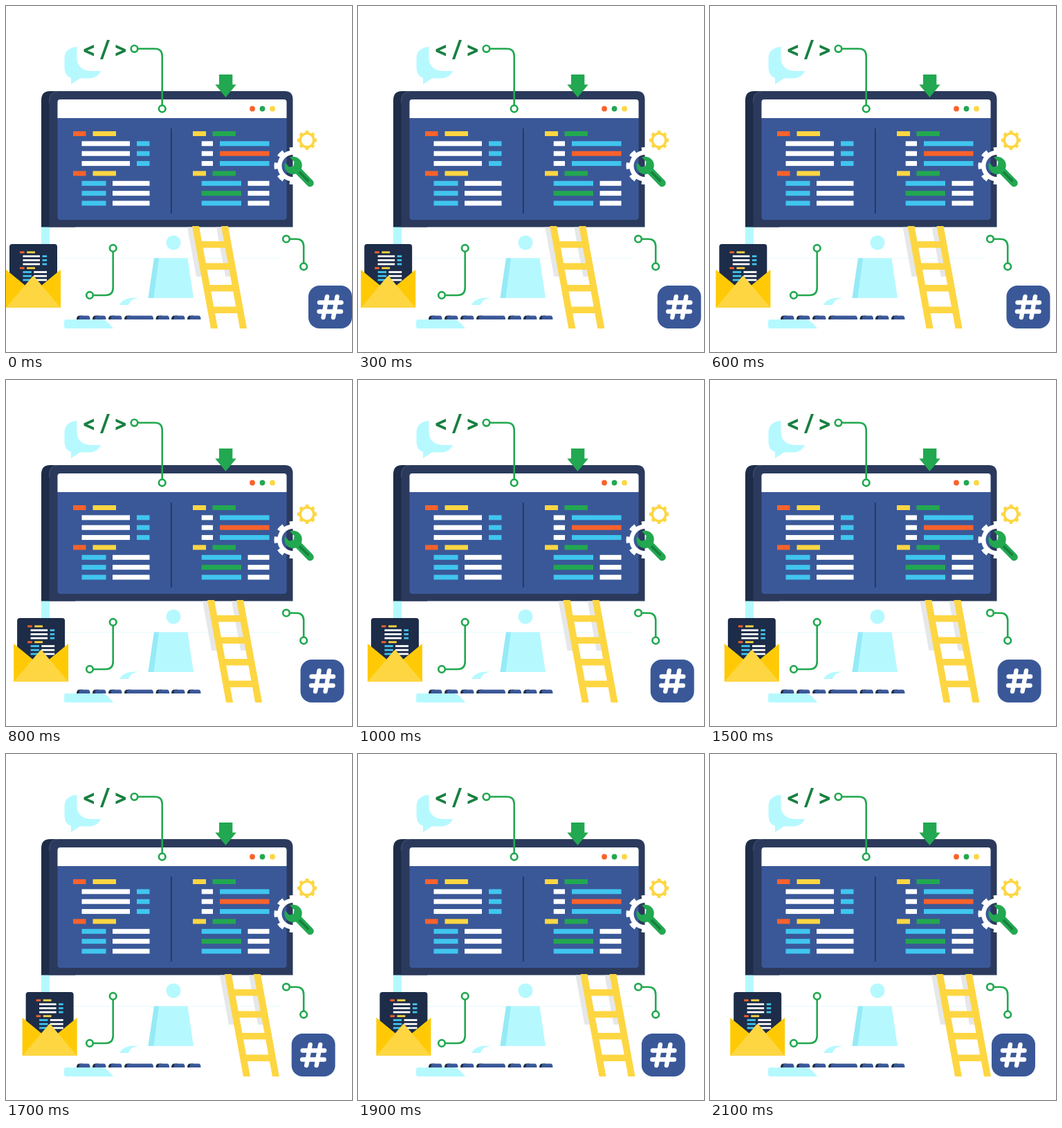
These frames come from a looping animation (500x500 px, 2200 ms). An HTML page:

```html
<!DOCTYPE html>
<html lang="en">
<head>
<meta charset="utf-8">
<title>Coding workspace</title>
<style>
  html, body { margin: 0; height: 100%; overflow: hidden; background: #fff; }
  svg { display: block; width: 100vw; height: 100vh; }
  .navy { fill: #2b3a5c; }
  .dark { fill: #1d2c48; }
  .blue { fill: #3a5898; }
  .ice { fill: #b5f9ff; }
  .shade { fill: #96eaf6; }
  .green { fill: #22a850; }
  .forest { fill: #188040; }
  .orange { fill: #f9622c; }
  .yellow { fill: #fdd642; }
  .gold { fill: #ffca05; }
  .cyan { fill: #40c5ef; }
  .white { fill: #fff; }
  .grey { fill: #e6e7e9; }
  .wire { fill: none; stroke: #22a850; stroke-width: 2.6; }
  .node { fill: #fff; stroke: #22a850; stroke-width: 2.7; }
  .ring { fill: none; }
</style>
</head>
<body>
<svg viewBox="0 0 500 500">
  <!-- chat bubble and code tag -->
  <path class="ice" d="M102.500 59C90 60 84.500 66 84.500 76V88C84.500 97 88 102 94 104V113L107 104.500H120Q133 104 137 94H122C109 93 102.500 86 102.500 75Z"/>
  <g class="forest">
    <path id="angle" d="M127 56V60.300L117.500 64.300 127 68.300V72.500L112.500 66V62.600Z"/>
    <use href="#angle" transform="matrix(-1 0 0 1 285.500 0)"/>
    <path d="M146 49H150L140 77H136Z"/>
  </g>

  <!-- monitor -->
  <path class="ice" d="M51 319H63V364H51Z"/>
  <path d="M63 364.500H395" stroke="#e4fbfe"/>
  <path class="dark" d="M51 319.500V136Q51 123 64 123H100V319.500Z"/>
  <path class="navy" d="M62.500 319.500V136Q62.500 123 75 123H403Q414.500 123 414.500 135V319.500Z"/>
  <path d="M62.700 140V136Q63 124 74 123.400" fill="none" stroke="#53617e" stroke-width=".7"/>
  <rect class="blue" x="74.500" y="135" width="331" height="174" rx="4"/>
  <path class="white" d="M74.500 162V139Q74.500 135 78.500 135H401.500Q405.500 135 405.500 139V162Z"/>
  <circle class="orange" cx="356" cy="148.500" r="3.900"/>
  <circle class="green" cx="370.500" cy="148.500" r="3.900"/>
  <circle class="yellow" cx="385" cy="148.500" r="3.900"/>
  <path d="M238.800 177V300" stroke="#1d2c48" stroke-width="1.300"/>
  <g id="left"></g>
  <g id="right"></g>

  <!-- stand, keyboard and mouse pad -->
  <circle class="ice" cx="242" cy="342" r="10.500"/>
  <path class="ice" d="M214 364.500H262.500L271 422H205.500Z"/>
  <path class="shade" d="M214 364.500H221L213.500 422H205.500Z"/>
  <path class="ice" d="M164 432Q169 421.500 187 421.500H192Q180 423 177 432Z"/>
  <g id="keys"></g>
  <path class="ice" d="M84 456Q84 453 87 453H139Q146 454 155 466H87Q84 466 84 463Z"/>

  <!-- circuit wires -->
  <path class="wire" d="M185.500 61.800H215Q225.700 61.800 225.700 72.500V148.500M154.700 350V407Q154.700 418 144 418H121M405 336.700H419.500Q430.200 336.700 430.200 347.500V376.500"/>
  <g id="nodes"></g>

  <path class="green" d="M308 99H327.300V113.500H332.700L317.500 132 302.300 113.500H308Z"/>

  <!-- gears and wrench -->
  <g class="ring" stroke="#fff">
    <circle cx="414.500" cy="231" r="19.200" stroke-width="6.400"/>
    <circle cx="414.500" cy="231" r="24" stroke-width="6" pathLength="16" stroke-dasharray="1" stroke-dashoffset=".5"/>
  </g>
  <g class="ring" stroke="#fdd642">
    <circle cx="435" cy="194" r="9.800" stroke-width="3.600"/>
    <circle cx="435" cy="194" r="12" stroke-width="4" pathLength="16" stroke-dasharray="1" stroke-dashoffset=".5"/>
  </g>
  <path class="green" d="M403.200 226A12.700 12.700 0 1 0 410 218.800L416.500 225 415.500 231.500 409 232.500Z"/>
  <path d="M422 238L439.500 256" stroke="#22a850" stroke-width="10.500" stroke-linecap="round"/>
  <path d="M424 240L437.500 253.500" stroke="#188040" stroke-width="3.600"/>

  <!-- moving parts -->
  <g id="ladder">
    <path class="grey" d="M262 319.500H272L285 391H275ZM304 319.500H314L327 391H317Z"/>
    <path class="yellow" d="M269 318H279L306 466H296ZM311 318H321L348 466H338Z"/>
    <g id="rungs"></g>
  </g>
  <g id="mail">
    <path class="dark" d="M5 420V348Q5 344 9 344H70Q74 344 74 348V420Z"/>
    <use href="#left" transform="translate(-14.200 282.500) scale(.353 .398)"/>
    <path class="gold" d="M0 381L39.500 413.500 79 381V436H0Z"/>
    <path class="yellow" d="M0 436L38.500 390.500Q39.500 389.500 40.500 390.500L79 436Z"/>
  </g>
  <g id="tag">
    <rect class="blue" x="437" y="404" width="63" height="62" rx="16"/>
    <path d="M464 420L458.500 450M478.500 420L473 450M453 428.500H484.500M452.500 441.500H484" stroke="#fff" stroke-width="6.400" stroke-linecap="round"/>
  </g>
</svg>
<script>
  const get = id => document.getElementById(id);
  const bar = (color, x1, x2, row) =>
    `<rect class="${color}" x="${x1}" y="${181 + row * 14.36}" width="${x2 - x1}" height="7"/>`;

  let left = "", right = "";
  for (let row = 0; row < 8; row++) {
    if (row % 4 === 0) {
      left += bar("orange", 97, 115.5, row) + bar("yellow", 125.5, 159, row);
      right += bar("yellow", 270, 289, row) + bar("green", 298.5, 332, row);
    } else if (row < 4) {
      left += bar("white", 109.5, 179, row) + bar("cyan", 189, 207.5, row);
      right += bar("white", 282.7, 299, row) + bar(row === 2 ? "orange" : "cyan", 309, 380.5, row);
    } else {
      left += bar("cyan", 109.5, 144.5, row) + bar("white", 154, 207.5, row);
      right += bar(row === 6 ? "green" : "cyan", 282.7, 340, row) + bar("white", 349.5, 380.5, row);
    }
  }
  get("left").innerHTML = left;
  get("right").innerHTML = right;

  const key = (x, w) =>
    `<path class="dark" d="M${x} 453Q${x} 447.500 ${x + 4} 447.500H${x + 9}V453Z"/>` +
    `<path class="blue" d="M${x + 3.5} 453Q${x + 3.5} 447.500 ${x + 6} 447.500H${x + w - 3}Q${x + w} 447.500 ${x + w} 453Z"/>`;
  get("keys").innerHTML = [102, 125, 148, 171, 216.5, 239, 262]
    .map(x => key(x, x === 171 ? 42 : 19.5)).join("");

  get("nodes").innerHTML =
    [[185.5, 61.8], [225.7, 148.5], [154.7, 350], [121, 418], [405, 336.7], [430.2, 376.5]]
      .map(([x, y]) => `<circle class="node" cx="${x}" cy="${y}" r="4.800"/>`).join("");

  get("rungs").innerHTML = [340, 371.5, 403, 434.5].map(y => {
    const x = 274 + (y - 318) * 27 / 148;
    return `<path class="yellow" d="M${x} ${y}h42l1.700 9.500h-42z"/>`;
  }).join("");

  // Each part slides sideways by a fixed amount per 100 ms step.
  const speeds = { ladder: 2.76, mail: 1.39, tag: -1.43 };
  const start = performance.now();
  function draw() {
    const step = Math.floor((performance.now() - start) % 2200 / 100);
    for (const id in speeds)
      get(id).setAttribute("transform", `translate(${speeds[id] * step} 0)`);
    requestAnimationFrame(draw);
  }
  draw();
</script>
</body>
</html>
```
